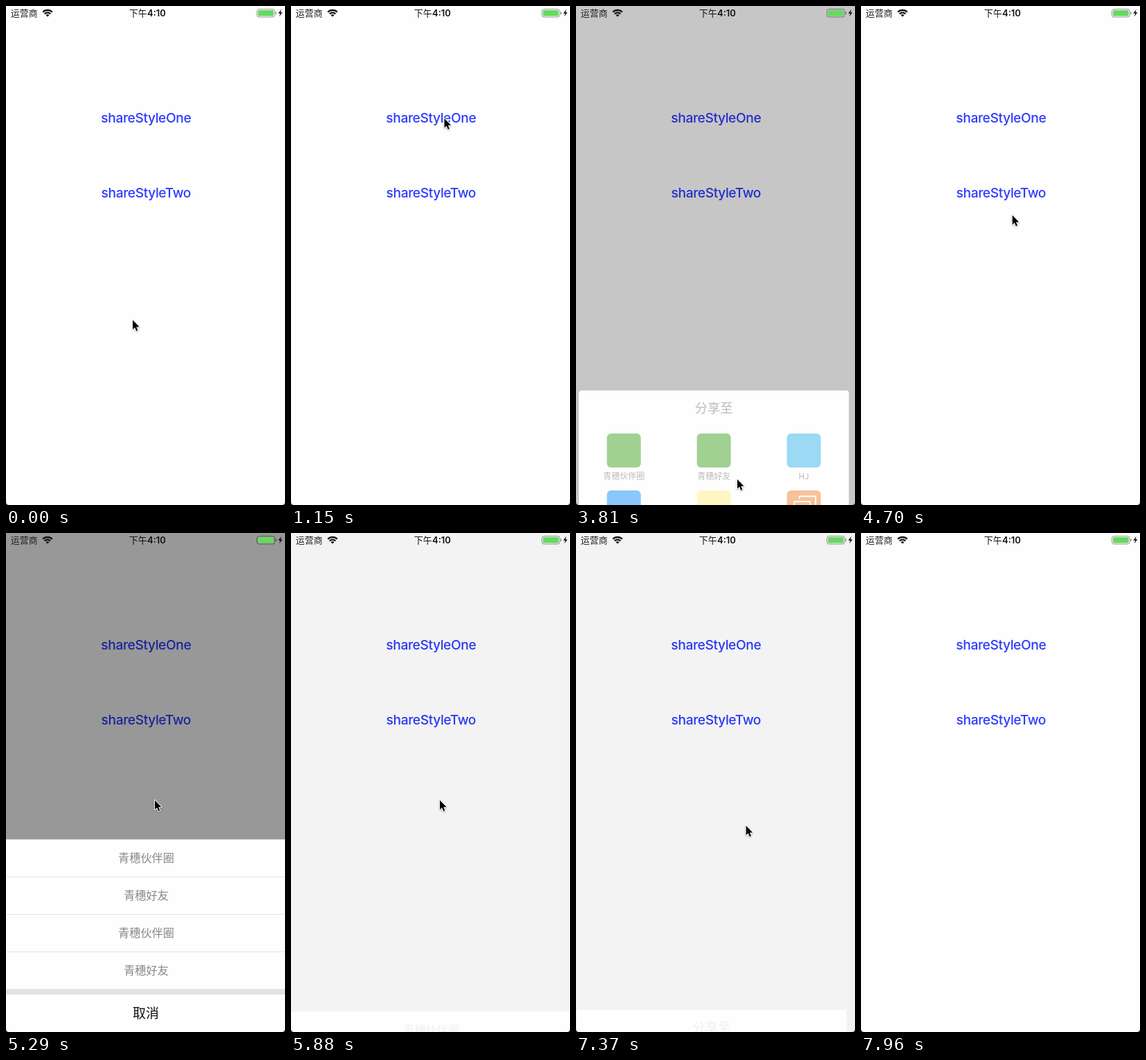
Recreate the animation shown at these times as an HTML page with a canvas. Size 403x719 px, loop 8.23 s.

```html
<!DOCTYPE html>
<html lang="zh-CN">
<head>
<meta charset="utf-8">
<title>Share sheets</title>
<style>
  html, body { margin: 0; width: 100%; height: 100%; overflow: hidden; background: #fefefe; }
  canvas { display: block; width: 403px; height: 719px; }
</style>
</head>
<body>
<canvas id="stage"></canvas>
<script>
const W = 403, H = 719, LOOP = 8230;
const TICK = LOOP / 56, LEAD = 30; // the screen refreshes once per tick
const CJK = '"Noto Sans CJK SC", "Noto Sans CJK", sans-serif';
const LATIN = 'Inter, sans-serif';
const GREY = '#888', INK = '#111', PAPER = '#fefefe', BLUE = '#2d3bff';
const scale = window.devicePixelRatio || 1;

// Pointer moves, timed in ticks
const START = { x: 182.5, y: 452.5 };
const MOVES = [
  { from: 1, to: 8, x: 221, y: 162 },
  { from: 13, to: 17, x: 240.5, y: 688.5 },
  { from: 17, to: 18, x: 232.5, y: 682 },
  { from: 27, to: 33, x: 217, y: 271 },
  { from: 34, to: 36, x: 214.5, y: 385 },
  { from: 40, to: 45, x: 209.5, y: 170.5 },
  { from: 46, to: 49, x: 226, y: 368 },
  { from: 49, to: 53, x: 348.5, y: 711.5 }
];
const HIDDEN = [{ from: 15, to: 17 }, { from: 54, to: 56 }];

// Sheets, with the ticks at which they open and start to close
const SHEETS = [
  { open: 10, close: 26, draw: drawGridSheet, height: 297, drift: -7.5 },
  { open: 33, close: 39, draw: drawListSheet, height: 278, drift: 0 },
  { open: 45, close: 49, draw: drawGridSheet, height: 297, drift: -7.5 }
];

const APPS = [
  ['青穗伙伴圈', '#55ae3a'], ['青穗好友', '#55ae3a'], ['HJ', '#4cbcec'],
  ['HJ小屋', '#2f9bfa'], ['橙屿快报', '#fff294'], ['复制链接', '#f0924a']
];
const ROWS = ['青穗伙伴圈', '青穗好友', '青穗伙伴圈', '青穗好友'];

const ease = p => p * p * (3 - 2 * p);
const clamp = p => Math.min(1, Math.max(0, p));

function setup(canvas) {
  canvas.width = W * scale;
  canvas.height = H * scale;
  const c = canvas.getContext('2d');
  c.scale(scale, scale);
  return c;
}

const ctx = setup(document.getElementById('stage'));
const layer = setup(document.createElement('canvas'));

// Text centred on both axes
function label(c, text, x, y, size, color, family = CJK, weight = 400) {
  c.font = `${weight} ${size}px ${family}`;
  c.fillStyle = color;
  c.textAlign = 'center';
  c.fillText(text, x, y + size * 0.37);
}

function box(c, x, y, w, h, r, color) {
  c.fillStyle = color;
  c.beginPath();
  c.roundRect(x, y, w, h, r);
  c.fill();
}

function poly(c, points, close) {
  c.beginPath();
  points.forEach(([x, y]) => c.lineTo(x, y));
  if (close) c.closePath();
}

function drawPage() {
  ctx.fillStyle = PAPER;
  ctx.fillRect(0, 0, W, H);
  ctx.letterSpacing = '-0.4px';
  label(ctx, 'shareStyleOne', 202.3, 161, 19.2, BLUE, LATIN, 450);
  label(ctx, 'shareStyleTwo', 202.3, 269, 19.2, BLUE, LATIN, 450);
  ctx.letterSpacing = '0px';
}

function drawCopyIcon(c, x, y) {
  c.strokeStyle = '#fff';
  c.lineWidth = 1.8;
  c.lineJoin = 'round';
  c.beginPath();
  c.roundRect(x + 10.5, y + 16, 23, 23, 1.5);
  c.stroke();
  poly(c, [[x + 18, y + 12], [x + 18, y + 8.5], [x + 41.5, y + 8.5], [x + 41.5, y + 32], [x + 37, y + 32]]);
  c.stroke();
}

function drawGridSheet(c) {
  box(c, 7.5, 422, 390, 228, 4, PAPER);
  box(c, 7.5, 657.5, 390, 54, 4, PAPER);
  label(c, '分享至', 202.5, 447, 18.2, GREY);
  APPS.forEach(([name, color], i) => {
    const x = 48 + (i % 3) * 130, y = 484 + Math.floor(i / 3) * 82;
    box(c, x, y, 49, 49, 6, color);
    if (name === '复制链接') drawCopyIcon(c, x, y);
    label(c, name, x + 24.5, y + 61.5, 12, GREY);
  });
  label(c, '取消', 202, 685, 19, INK);
}

function drawListSheet(c) {
  c.fillStyle = PAPER;
  c.fillRect(0, 441.5, W, H - 441.5);
  ROWS.forEach((name, i) => {
    label(c, name, 202.5, 468.5 + i * 54, 16.2, GREY);
    c.fillStyle = '#e4e4e4';
    c.fillRect(0, 495 + i * 54, W, 1);
  });
  c.fillStyle = '#e2e2e2';
  c.fillRect(0, 657, W, 8);
  label(c, '取消', 202, 692, 19, INK);
}

// Opening settles exponentially under a full dim; closing slides and fades evenly
function drawSheet(sheet, tick) {
  const gone = clamp(0.446 * (tick - sheet.close + 1));
  if (tick < sheet.open || gone === 1) return;
  const drop = gone || 0.304 * 0.1 ** (tick - sheet.open);
  layer.clearRect(0, 0, W, H);
  layer.fillStyle = 'rgba(0,0,0,0.4)';
  layer.fillRect(0, 0, W, H);
  layer.save();
  layer.translate(sheet.drift * gone, Math.round(sheet.height * drop));
  sheet.draw(layer);
  layer.restore();
  ctx.globalAlpha = 1 - gone;
  ctx.drawImage(layer.canvas, 0, 0, W, H);
  ctx.globalAlpha = 1;
}

function drawWifi(x, y) {
  const from = -Math.PI * 0.75, to = -Math.PI * 0.25;
  ctx.strokeStyle = ctx.fillStyle = INK;
  ctx.lineWidth = 2.3;
  for (const r of [9.6, 6]) {
    ctx.beginPath();
    ctx.arc(x, y, r, from, to);
    ctx.stroke();
  }
  ctx.beginPath();
  ctx.moveTo(x, y);
  ctx.arc(x, y, 3.5, from, to);
  ctx.fill();
}

function drawStatus() {
  label(ctx, '运营商', 26.3, 10.3, 13, '#222');
  drawWifi(60, 15.6);
  label(ctx, '下午', 190.8, 10.3, 13, INK, CJK, 500);
  label(ctx, '4:10', 217.5, 10.1, 13, INK, LATIN, 600);
  ctx.strokeStyle = 'rgba(0,0,0,0.4)';
  ctx.lineWidth = 1;
  ctx.beginPath();
  ctx.roundRect(362.5, 4.5, 25.5, 11.5, 3);
  ctx.stroke();
  box(ctx, 364, 6, 22.5, 8.5, 1.5, '#67d961');
  box(ctx, 389, 8.3, 1.5, 4, [0, 1, 1, 0], 'rgba(0,0,0,0.4)');
  ctx.fillStyle = INK;
  poly(ctx, [[397.6, 4.8], [393.3, 10.7], [396, 10.7], [394.8, 15.2], [399.3, 9.2], [396.6, 9.2]], true);
  ctx.fill();
}

function drawCorners() {
  const r = 4.5;
  ctx.fillStyle = INK;
  for (const [x, s] of [[0, 1], [W, -1]]) {
    ctx.beginPath();
    ctx.moveTo(x, H);
    ctx.lineTo(x, H - r);
    ctx.quadraticCurveTo(x, H, x + s * r, H);
    ctx.fill();
  }
}

function pointerAt(tick) {
  let { x, y } = START;
  for (const m of MOVES) {
    const p = ease(clamp((tick - m.from) / (m.to - m.from)));
    x += (m.x - x) * p;
    y += (m.y - y) * p;
  }
  return [x, y];
}

function drawPointer(tick) {
  if (HIDDEN.some(h => tick >= h.from && tick < h.to)) return;
  ctx.save();
  ctx.translate(...pointerAt(tick));
  poly(ctx, [[0.5, 0], [0.5, 13.6], [3.6, 10.8], [5.7, 15.8], [7.9, 14.9], [5.8, 10], [10, 9.8]], true);
  ctx.lineJoin = 'round';
  ctx.lineWidth = 2;
  ctx.strokeStyle = '#fff';
  ctx.shadowColor = 'rgba(0,0,0,0.35)';
  ctx.shadowBlur = 2 * scale;
  ctx.shadowOffsetY = 0.7 * scale;
  ctx.stroke();
  ctx.shadowColor = 'transparent';
  ctx.fillStyle = '#000';
  ctx.fill();
  ctx.restore();
}

const start = performance.now();

function frame() {
  const t = (performance.now() - start) % LOOP;
  const tick = Math.min(55, Math.floor((t + LEAD) / TICK));
  drawPage();
  SHEETS.forEach(sheet => drawSheet(sheet, tick));
  drawStatus();
  drawCorners();
  drawPointer(tick);
  requestAnimationFrame(frame);
}
frame();
</script>
</body>
</html>
```
